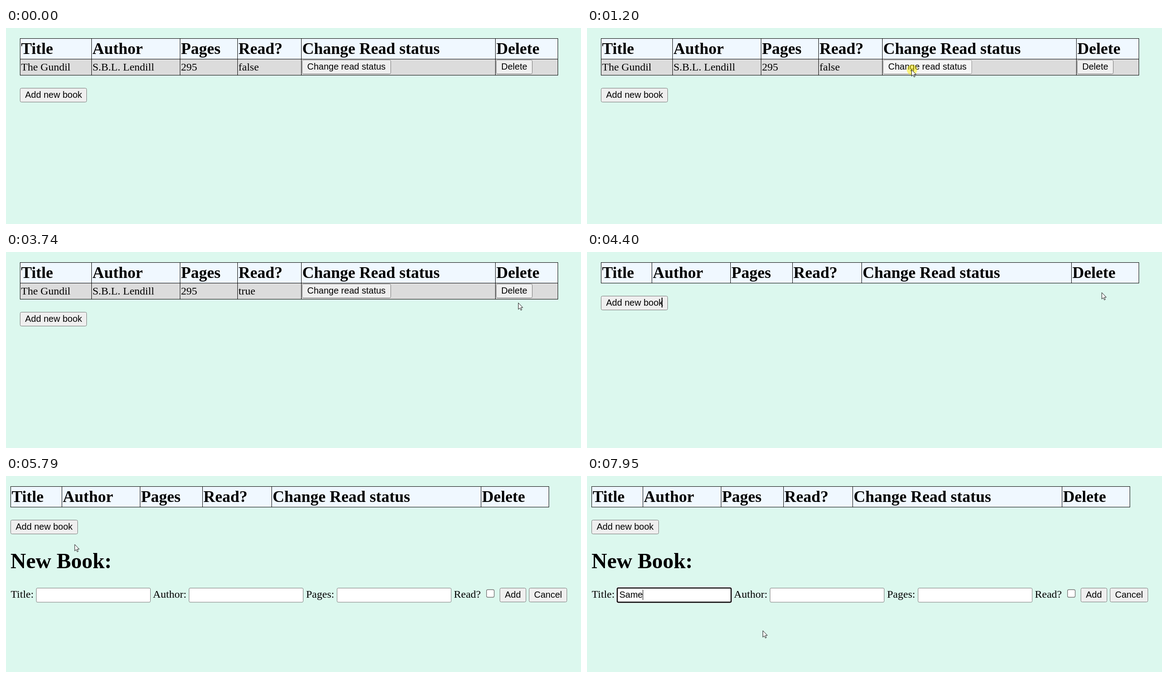
These frames come from a looping animation (1280 px wide and 438 px high, 8000 ms). An HTML page:

```html
<!DOCTYPE html>
<html lang="en">
<head>
<meta charset="utf-8">
<title>Book list</title>
<style>
html, body { margin: 0; width: 100%; height: 100%; overflow: hidden; background: #dcf8ee; }
svg { display: block; width: 1280px; height: 438px; }
text { white-space: pre; font: 24px "Liberation Serif", "Times New Roman", serif; }
.th { font-size: 36px; font-weight: bold; }
.h1 { font-size: 48px; font-weight: bold; }
.ui { font: 20px "Liberation Sans", Arial, sans-serif; }
.btn rect { fill: #efefef; stroke: #767676; }
.btn.hover rect { fill: #e5e5e5; stroke: #4f4f4f; }
.btn.down rect { fill: #f5f5f5; stroke: #8d8d8d; }
.field { fill: #fff; stroke: #767676; }
</style>
</head>
<body>
<svg id="stage" viewBox="0 0 1280 438"></svg>
<script>
const LOOP = 8000, HOLD = 170, BLINK = 530;
const HEADS = ["Title", "Author", "Pages", "Read?", "Change Read status", "Delete"];
const BOOK = ["The Gundil", "S.B.L. Lendill", "295", "false"];
const TYPED = "Same";

const pen = document.createElement("canvas").getContext("2d");
function measure(s, font) {
  pen.font = `${font} "Liberation Serif", "Times New Roman", serif`;
  return pen.measureText(s).width;
}

const text = (x, y, s, cls = "", id = "") =>
  `<text x="${x}" y="${y}" class="${cls}" id="${id}">${s}</text>`;
const box = (x, y, w, h, attrs) =>
  `<rect x="${x}" y="${y}" width="${w}" height="${h}" ${attrs}/>`;

const buttons = [];
function button(x, y, w, label) {
  const id = "btn" + buttons.length;
  buttons.push({ id, x, y, w });
  return `<g class="btn" id="${id}">${box(x + .5, y + .5, w - 1, 31, 'rx="3"')}` +
    text(x + 11.5, y + 22, label, "ui") + "</g>";
}

// Columns share the width in proportion to their widest content.
function columns(left, row) {
  const need = HEADS.map((s, i) =>
    4 + Math.max(measure(s, "bold 36px"), measure(row[i] || "", "24px")));
  const scale = 1197.4 / need.reduce((a, b) => a + b);
  let x = left;
  return [left, ...need.map(w => x += w * scale)].map(Math.round);
}

function table(left, row = []) {
  const cols = columns(left, row), x0 = cols[0], x1 = cols[6] + 1;
  const rules = row.length ? [23, 69, 105] : [23, 69];
  const lines = cols.map(x => `M${x + .5} 23V${rules[rules.length - 1] + 1}`)
    .concat(rules.map(y => `M${x0} ${y + .5}H${x1}`)).join("");
  return box(x0, 23, x1 - x0, 46, 'fill="#f0f8ff"') +
    (row.length ? box(x0, 69, x1 - x0, 36, 'fill="#dcdcdc"') : "") +
    `<path d="${lines}" stroke="#000" fill="none"/>` +
    HEADS.map((s, i) => text(cols[i] + 2.5, 58, s, "th")).join("") +
    row.map((s, i) => text(cols[i] + 2.5, 95, s, "", i === 3 ? "read" : "")).join("") +
    (row.length ? button(cols[4] + 2, 71, 198, "Change read status") + button(cols[5] + 2, 71, 81, "Delete") : "");
}

const labelled = (label, x, fieldX) =>
  text(x, 272, label) + box(fieldX + .5, 250.5, 254, 31.5, 'rx="2.5" class="field"');

const scenes = [
  table(30.9, BOOK) + button(31, 134, 149, "Add new book"),
  table(30.9) + button(31, 98, 149, "Add new book"),
  table(10.4) + button(10, 98, 150, "Add new book") +
    text(10, 206, "New Book:", "h1") +
    labelled("Title:", 10.5, 67) + labelled("Author:", 327, 407) + labelled("Pages:", 668, 736.5) +
    `<g id="ring">${box(65.5, 248.5, 257, 35.5, 'rx="4" fill="none" stroke="#fff"')}` +
    box(67.3, 250.3, 253.6, 31.8, 'rx="2.5" fill="#fff" stroke="#101010" stroke-width="2.6"') + "</g>" +
    text(72, 272, "", "ui", "typed") +
    text(997, 272, "Read?") +
    box(1069.7, 254, 17, 17, 'rx="3" fill="#fff" stroke="#767676" stroke-width="1.4"') +
    button(1099, 250, 59, "Add") + button(1164, 250, 85, "Cancel")
];

document.getElementById("stage").innerHTML =
  scenes.map((s, i) => `<g id="scene${i}">${s}</g>`).join("") +
  `<rect id="caret"/>
  <circle id="glow" r="11.5" fill="#fff000" fill-opacity=".5"/>
  <path id="arrow" d="M.5 .7V15.2L3.8 12.1 6.1 17.2 8.3 16.2 6.1 11.2H10.5Z" fill="#fff" stroke="#111"/>
  <path id="beam" d="M-4 -7.5H4M0 -7.5V7.5M-4 7.5H4" fill="none" stroke="#333"/>`;

const el = {};
document.querySelectorAll("[id]").forEach(n => { if (n.id) el[n.id] = n; });

// Pointer moves: start, end, then the Bézier points that follow the last position.
const ENTRY = [1137, 430];
const MOVES = [
  [220, 860, [690, 370], [600, 210], [722, 92.5]],
  [1370, 1430, [720.5, 94]],
  [3390, 3740, [860, 125], [1040, 135], [1140, 113]],
  [3940, 4110, [1145.5, 90]],
  [4560, 5380, [850, 125], [350, 145], [147, 121]],
  [5740, 6110, [173, 269]],
  [6270, 6390, [173.5, 282]],
  [6390, 6510, [391, 345]]
];
const PRESSES = [1200, 2070, 2850, 4230, 5410, 6150];
const FOCUS = PRESSES[5];
const KEYS = [...TYPED].map((_, i) => 7148 + 266 * i);
const BLINK_STARTS = [...PRESSES.slice(0, 3).map(p => p + HOLD), FOCUS, ...KEYS];

function bezier(pts, u) {
  while (pts.length > 1)
    pts = pts.slice(1).map((p, i) => p.map((v, k) => pts[i][k] + (v - pts[i][k]) * u));
  return pts[0];
}

function pointer(t) {
  let at = ENTRY;
  for (const [from, to, ...pts] of MOVES) {
    if (t < from) break;
    const k = Math.min(1, (t - from) / (to - from));
    at = bezier([at, ...pts], 1 - (1 - k) ** 1.6);
  }
  return at;
}

const show = (n, on) => { n.style.display = on ? "" : "none"; };
const place = (n, x, y) => n.setAttribute("transform", `translate(${x.toFixed(2)} ${y.toFixed(2)})`);

function drawCaret(t, scene) {
  const since = t - Math.max(...BLINK_STARTS.filter(s => s <= t));
  const idle = scene === 2 && t < FOCUS;
  show(el.caret, !idle && Math.floor(since / BLINK) % 2 === 0);
  const [x, y, w, h] = scene === 2
    ? [Math.floor(72 + el.typed.getComputedTextLength()), 254, 1, 23]
    : [166, scene ? 102 : 138, 2, 22];
  Object.entries({ x, y, width: w, height: h }).forEach(([k, v]) => el.caret.setAttribute(k, v));
}

function draw(t) {
  const [x, y] = pointer(t), seen = t >= MOVES[0][0];
  const over = (l, top, w, h) => seen && x >= l && x < l + w && y >= top && y < top + h;
  const down = PRESSES.some(p => t >= p && t < p + HOLD);
  const clicks = PRESSES.filter(p => t >= p + HOLD).length;
  const scene = Math.min(2, Math.max(0, clicks - 3));

  scenes.forEach((_, i) => show(el["scene" + i], i === scene));
  el.read.textContent = String(clicks % 2 === 1);
  for (const b of buttons) {
    const state = over(b.x, b.y, b.w, 32) ? (down ? " down" : " hover") : "";
    el[b.id].setAttribute("class", "btn" + state);
  }

  el.typed.textContent = TYPED.slice(0, KEYS.filter(k => t >= k).length);
  show(el.ring, t >= FOCUS);
  drawCaret(t, scene);

  const textual = scene === 2 && (over(10, 163, 224, 55) || over(67, 250, 255, 33));
  show(el.arrow, seen && !textual);
  show(el.beam, seen && textual);
  show(el.glow, down);
  place(el.arrow, x, y);
  place(el.beam, x, y);
  place(el.glow, x + 1.5, y + 1);
}

const start = performance.now();
function tick() {
  draw((performance.now() - start) % LOOP);
  requestAnimationFrame(tick);
}
tick();
</script>
</body>
</html>
```
